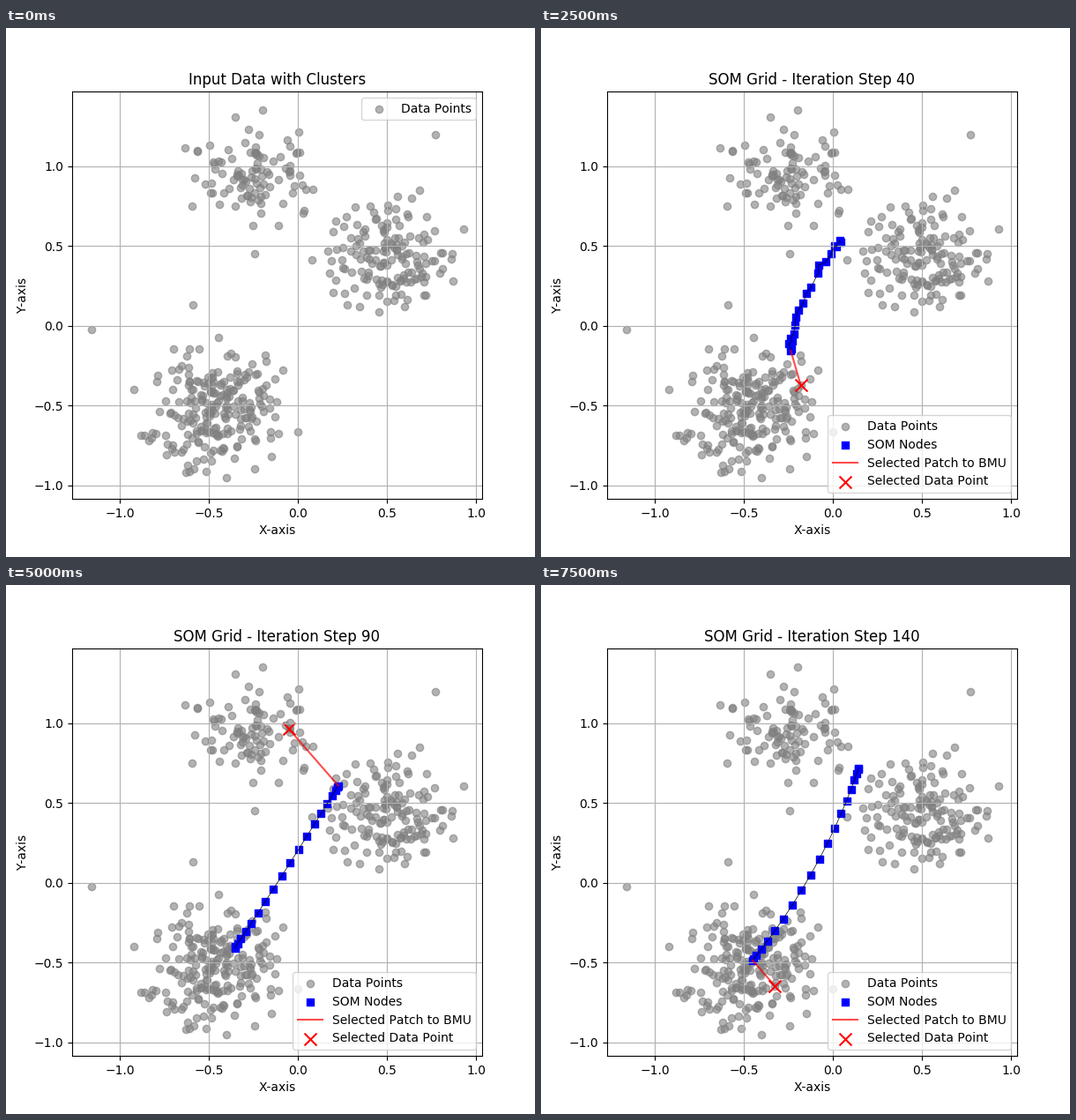
Recreate the animation shown at these times as a matplotlib script. Size 600 px wide and 600 px high, loop 8 s.

```python
import numpy as np
import matplotlib.pyplot as plt
from matplotlib.animation import FuncAnimation

plt.rcParams["text.kerning_factor"] = 6
rng = np.random.default_rng(7)


def blob(center, spread, n, reach=2.5):
    """Gaussian cluster without its far tail."""
    z = rng.normal(size=(2 * n, 2))
    z = z[np.hypot(*z.T) < reach][:n]
    return center + z * spread


# Data point chosen at every tenth step
picks = np.array([
    (0.49, 0.49), (-0.49, -0.415), (-0.45, -0.29), (0.40, 0.42),
    (-0.18, -0.37), (0.405, 0.75), (-0.30, -0.34), (0.47, 0.285),
    (-0.395, -0.52), (-0.05, 0.965), (0.655, 0.295), (0.485, 0.61),
    (-0.045, 1.125), (-0.56, -0.35), (-0.325, -0.645)])
strays = [(-1.16, -0.02), (-0.59, 0.13), (-0.24, 0.45), (0.77, 1.2), (0.93, 0.61)]
cloud = np.vstack([
    blob((-0.23, 0.97), (0.19, 0.17), 95),
    blob((0.51, 0.48), (0.19, 0.19), 145),
    blob((-0.47, -0.51), (0.20, 0.18), 210),
    strays, picks])

# Start, middle and end of the node chain at key steps
key_steps = [20, 50, 70, 100, 120, 140]
key_shapes = np.array([
    [(-0.14, 0.09), (-0.15, 0.19), (0.02, 0.51)],
    [(-0.30, -0.25), (-0.17, 0.17), (0.035, 0.55)],
    [(-0.34, -0.30), (-0.04, 0.165), (0.20, 0.55)],
    [(-0.36, -0.46), (-0.08, 0.045), (0.24, 0.64)],
    [(-0.40, -0.465), (-0.015, 0.095), (0.28, 0.66)],
    [(-0.45, -0.485), (-0.10, 0.10), (0.145, 0.72)]])

# Nodes bunch up towards both ends of the chain
u = (1 - np.cos(np.linspace(0, np.pi, 20))) / 2
weights = np.column_stack([(1 - u) * (1 - 2 * u), 4 * u * (1 - u), u * (2 * u - 1)])
jitter = rng.uniform((-0.5, -1.05), (0.9, 0.8), (20, 2))


def chain(step):
    """Random scatter dies out and leaves a smooth arc."""
    cols = key_shapes.reshape(len(key_steps), -1).T
    ctrl = np.array([np.interp(step, key_steps, c) for c in cols]).reshape(3, 2)
    return weights @ ctrl + jitter * np.exp(-step / 10)


fig, ax = plt.subplots(figsize=(6, 6), dpi=100)
ax.set(xlim=(-1.2665, 1.0345), ylim=(-1.083, 1.469),
       xlabel="X-axis", ylabel="Y-axis")
ax.grid(True)
title = ax.set_title("")

data = ax.scatter(*cloud.T, color="gray", alpha=0.6, label="Data Points")
nodes = ax.scatter([], [], color="blue", marker="s", label="SOM Nodes")
links, = ax.plot([], [], "k-", lw=0.5)
ray, = ax.plot([], [], "r-", alpha=0.7, label="Selected Patch to BMU")
cross = ax.scatter([], [], color="red", marker="x", s=100,
                   label="Selected Data Point")

intro_key = ax.legend(handles=[data], loc="upper right")
ax.add_artist(intro_key)
grid_key = ax.legend(handles=[data, nodes, ray, cross], loc="lower right")


def draw(i):
    training = i > 0
    for art in (nodes, links, ray, cross, grid_key):
        art.set_visible(training)
    intro_key.set_visible(not training)
    if not training:
        title.set_text("Input Data with Clusters")
        return
    step = 10 * (i - 1)
    title.set_text(f"SOM Grid - Iteration Step {step}")
    w, p = chain(step), picks[i - 1]
    bmu = w[np.argmin(np.linalg.norm(w - p, axis=1))]
    nodes.set_offsets(w)
    links.set_data(*w.T)
    ray.set_data(*np.array([p, bmu]).T)
    cross.set_offsets([p])


anim = FuncAnimation(fig, draw, frames=16, interval=500, repeat=True,
                     repeat_delay=0, blit=False)
plt.show()
```
